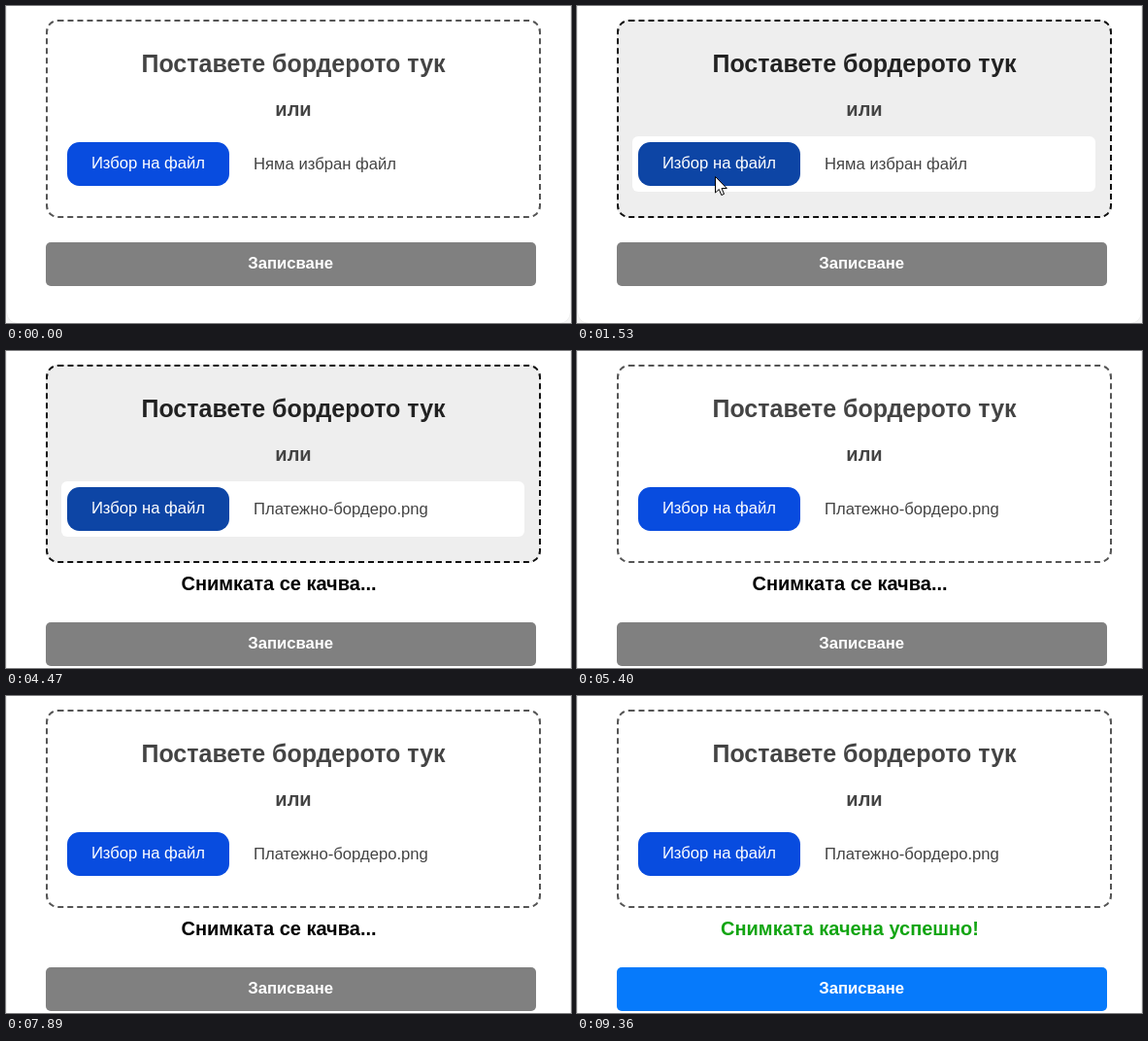
These frames come from a looping animation (582x326 px, 9390 ms). An HTML page:

```html
<!DOCTYPE html>
<html lang="bg">
<head>
<meta charset="utf-8">
<title>Качване на бордеро</title>
<style>
  html, body { margin: 0; width: 100%; height: 100%; overflow: hidden; background: #f6f6f6; }
  #stage { position: relative; width: 582px; height: 326px; overflow: hidden; }
  #stage > * { position: absolute; box-sizing: border-box; }
  #card { left: 0; top: -20px; width: 582px; height: 347px; background: #fff; border: 1px solid #eee; border-radius: 12px; }
  #drop { left: 41px; top: 14px; width: 510px; height: 204px; border: 2px dashed #555; border-radius: 12.5px; }
  #input { left: 57px; top: 134px; width: 477px; height: 57px; background: #fff; border-radius: 6px; }
  #pick { left: 63px; top: 140px; width: 167px; height: 45px; background: #084cdf; border-radius: 12.5px; }
  #save { left: 41px; top: 243px; width: 505px; height: 45px; background: #808080; border-radius: 5px; }
  svg { left: 0; top: 0; overflow: hidden; }
  text { font-family: "Liberation Sans", Arial, sans-serif; font-size: 16.67px; fill: #444; }
  .bold { font-weight: bold; }
  .mid { text-anchor: middle; }
  .white { fill: #fff; }
  #title { font-size: 25px; }
  .sub { font-size: 20px; }
  #shadow {
    left: 0; top: 0; width: 582px; height: 80px;
    background: linear-gradient(rgba(0,0,0,.26), rgba(0,0,0,.21) 7px, rgba(0,0,0,.12) 20px,
      rgba(0,0,0,.05) 42px, rgba(0,0,0,0) 76px);
  }
</style>
</head>
<body>
<div id="stage">
  <div id="card"></div>
  <div id="drop"></div>
  <div id="input"></div>
  <div id="pick"></div>
  <div id="save"></div>
  <svg width="582" height="326">
    <text id="title" class="bold mid" x="296" y="68">Поставете бордерото тук</text>
    <text class="bold mid sub" x="296" y="113">или</text>
    <text class="mid white" x="146.5" y="167">Избор на файл</text>
    <text id="none" x="255" y="168">Няма избран файл</text>
    <text id="file" x="255" y="168">Платежно-бордеро.png</text>
    <text id="busy" class="bold mid sub" x="281" y="246" style="fill:#000">Снимката се качва...</text>
    <text id="done" class="bold mid sub" x="281" y="246" style="fill:#12a512">Снимката качена успешно!</text>
    <text id="label" class="bold mid white" x="293.2" y="270">Записване</text>
  </svg>
  <div id="shadow"></div>
  <svg id="cursor" width="14" height="21" viewBox="-.5 -.5 14 21">
    <path d="M0 0V16.5L3.8 13L6.3 19L9 17.8L6.5 12H11.8Z" fill="#fff" stroke="#000"/>
  </svg>
</div>
<script>
  const LOOP = 9390;
  const T = {
    cursorIn: 600, hover: 750, pickHover: 900, rest: 1050, dialog: 1770,
    dialogEnd: 3090, chosen: 3210, leave: 4690, done: 8550
  };

  // steps: [time, value]; equal times make a hard change
  function track(id, prop, steps) {
    const all = [[0, steps[0][1]], ...steps, [LOOP, steps[steps.length - 1][1]]];
    const frames = all.map(([t, v]) => ({ offset: t / LOOP, [prop]: v, easing: "ease-in-out" }));
    document.getElementById(id).animate(frames, { duration: LOOP, iterations: Infinity });
  }
  // each change: [time, fade length], toggling between a and b
  function toggle(id, prop, a, b, ...changes) {
    const steps = changes.flatMap(([t, fade], i) => {
      const pair = i % 2 ? [b, a] : [a, b];
      return [[t, pair[0]], [t + fade, pair[1]]];
    });
    track(id, prop, steps);
  }

  const hover = [[T.hover, 200], [T.leave, 200]];
  toggle("drop", "backgroundColor", "#fff", "#eee", ...hover);
  toggle("drop", "borderColor", "#555", "#111", ...hover);
  toggle("title", "fill", "#444", "#222", ...hover);
  toggle("pick", "backgroundColor", "#084cdf", "#0d45a5", [T.pickHover, 200], [T.leave, 200]);

  toggle("shadow", "opacity", 0, 1, [T.dialog, 120], [T.dialogEnd, 90]);
  toggle("cursor", "opacity", 0, 1, [T.cursorIn, 0], [T.dialog, 0]);
  track("cursor", "transform", [
    [T.cursorIn, "translate(186px, 250px)"],
    [T.rest, "translate(142px, 175px)"]
  ]);

  toggle("none", "opacity", 1, 0, [T.chosen, 0]);
  toggle("file", "opacity", 0, 1, [T.chosen, 0]);
  toggle("busy", "opacity", 0, 1, [T.chosen, 0], [T.done, 0]);
  toggle("done", "opacity", 0, 1, [T.done, 0]);
  for (const id of ["save", "label"])
    toggle(id, "transform", "translateY(0px)", "translateY(36px)", [T.chosen, 0]);
  toggle("card", "height", "347px", "383px", [T.chosen, 0]);
  toggle("save", "backgroundColor", "#808080", "#067afb", [T.done, 200]);
</script>
</body>
</html>
```
